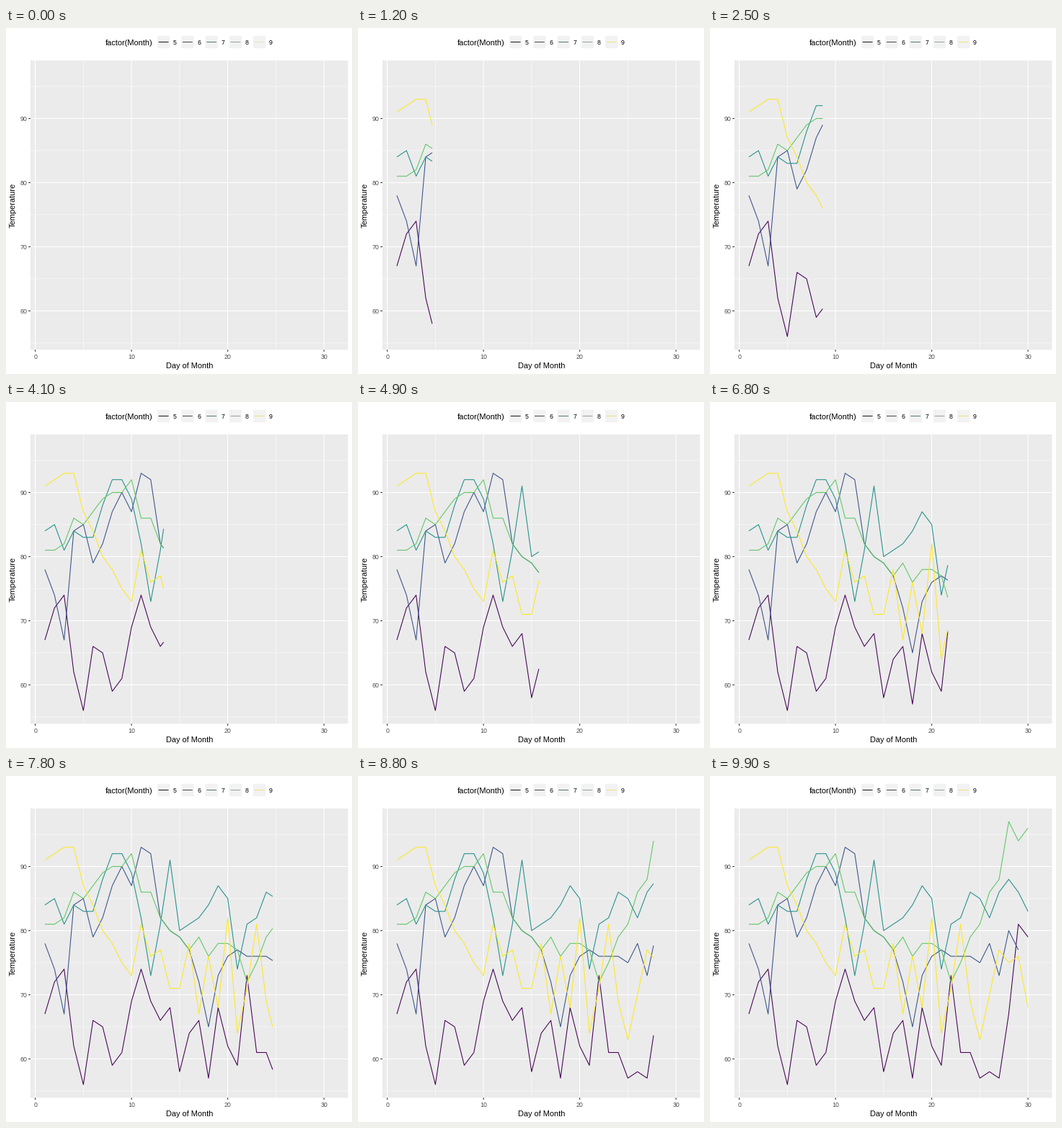
These frames come from a looping animation (480x480 px, 10 s). A matplotlib script:

```python
import matplotlib.pyplot as plt
import numpy as np
from matplotlib.animation import FuncAnimation
from matplotlib.patches import Rectangle

SIZE, DPI = 480, 72
FRAMES, INTERVAL = 100, 100
LEFT, RIGHT, TOP, BOTTOM = 33.9, 474.5, 45.0, 446.3
LINE = 1.07

plt.rcParams["font.family"] = "Liberation Sans"
plt.rcParams["path.snap"] = False

fig = plt.figure(figsize=(SIZE / DPI, SIZE / DPI), dpi=DPI, facecolor="white")
ax = fig.add_axes([0, 0, 1, 1])
ax.set_xlim(0, SIZE)
ax.set_ylim(SIZE, 0)
ax.axis("off")


def px(day):
    return LEFT + (np.asarray(day) + 0.5) * (RIGHT - LEFT) / 33


def py(temp):
    return BOTTOM - (np.asarray(temp) - 53.95) * (BOTTOM - TOP) / 45.1


def stroke(xs, ys, color, width=LINE, z=2):
    return ax.plot(xs, ys, color=color, lw=width, zorder=z,
                   solid_capstyle="butt", solid_joinstyle="round")[0]


def box(x, y, w, h, color):
    ax.add_patch(Rectangle((x, y), w, h, fc=color, ec="none", lw=0))


def label(x, y, text, size, color="black", ha="center", **kw):
    kw.setdefault("va", "baseline")
    ax.text(x, y, text, size=size, color=color, ha=ha, **kw)


# Panel, grid and axes
box(LEFT, TOP, RIGHT - LEFT, BOTTOM - TOP, "#ebebeb")
for day in range(0, 31, 5):
    x, major = px(day), day % 10 == 0
    stroke([x, x], [TOP, BOTTOM], "white", LINE if major else LINE / 2)
    if major:
        stroke([x, x], [BOTTOM, BOTTOM + 2.74], "#333333")
        label(x, 459, str(day), 8.8, "#4d4d4d")
for temp in range(55, 96, 5):
    y, major = py(temp), temp % 10 == 0
    stroke([LEFT, RIGHT], [y, y], "white", LINE if major else LINE / 2)
    if major:
        stroke([LEFT - 2.74, LEFT], [y, y], "#333333")
        label(29, y + 3.15, str(temp), 8.8, "#4d4d4d", "right")

label((LEFT + RIGHT) / 2, 472, "Day of Month", 11)
label(13, (TOP + BOTTOM) / 2, "Temperature", 11, rotation=90,
      va="center", ha="right", rotation_mode="default") if False else \
    label(13, (TOP + BOTTOM) / 2, "Temperature", 11, rotation=90,
          rotation_mode="anchor")

# Legend
label(138, 24, "factor(Month)", 11, ha="left")
KEY_COLORS = ["#26192f", "#4a4d60", "#5c7f78", "#9aa89c", "#efe47c"]
keys = []
for i, color in enumerate(KEY_COLORS):
    x = 210 + 33.25 * i
    box(x, 10.9, 17.28, 17.28, "#f2f2f2")
    keys.append(stroke([x + 1.7, x + 15.5], [19.5, 19.5], color))
    label(x + 22, 23, str(5 + i), 8.8, ha="left")

# Daily temperatures, one series per month
may = [67, 72, 74, 62, 56, 66, 65, 59, 61, 69, 74, 69, 66, 68, 58, 64,
       66, 57, 68, 62, 59, 73, 61, 61, 57, 58, 57, 67, 81, 79, 76]
june = [78, 74, 67, 84, 85, 79, 82, 87, 90, 87, 93, 92, 82, 80, 79, 77,
        72, 65, 73, 76, 77, 76, 76, 76, 75, 78, 73, 80, 77, 83]
july = [84, 85, 81, 84, 83, 83, 88, 92, 92, 89, 82, 73, 81, 91, 80, 81,
        82, 84, 87, 85, 74, 81, 82, 86, 85, 82, 86, 88, 86, 83, 81]
august = [81, 81, 82, 86, 85, 87, 89, 90, 90, 92, 86, 86, 82, 80, 79, 77,
          79, 76, 78, 78, 77, 72, 75, 79, 81, 86, 88, 97, 94, 96, 94]
september = [91, 92, 93, 93, 87, 84, 80, 78, 75, 73, 81, 76, 77, 71, 71, 78,
             67, 76, 68, 82, 64, 71, 81, 69, 63, 70, 77, 75, 76, 68]
months = [may, june, july, august, september]
VIRIDIS = ["#440154", "#3b528b", "#21908c", "#5dc863", "#fde725"]
lines = [stroke([], [], c, z=3) for c in VIRIDIS]

# Each day is reached on a whole frame
DAYS = np.arange(1, 32)
KNOTS = [round((d - 1) * 99 / 30) for d in range(1, 32)]


def reveal(temps, frame, keep_last):
    n = len(temps)
    days = DAYS[:n]
    if frame >= KNOTS[n - 1]:
        # a finished series loses its last point, except the final one
        end = n if keep_last else n - 1
        return days[:end], temps[:end]
    now = np.interp(frame, KNOTS, DAYS)
    xs = np.append(days[days < now], now)
    return xs, np.interp(xs, days, temps)


def draw(frame):
    for line, temps in zip(lines, months):
        xs, ys = reveal(temps, frame, temps is september)
        line.set_data(px(xs), py(ys))
        line.set_visible(frame > 0)
    keys[4].set_color(KEY_COLORS[4] if frame else "#e6e5c6")
    return lines + keys


anim = FuncAnimation(fig, draw, frames=FRAMES, interval=INTERVAL,
                     repeat=True, repeat_delay=0, blit=False)
plt.show()
```
